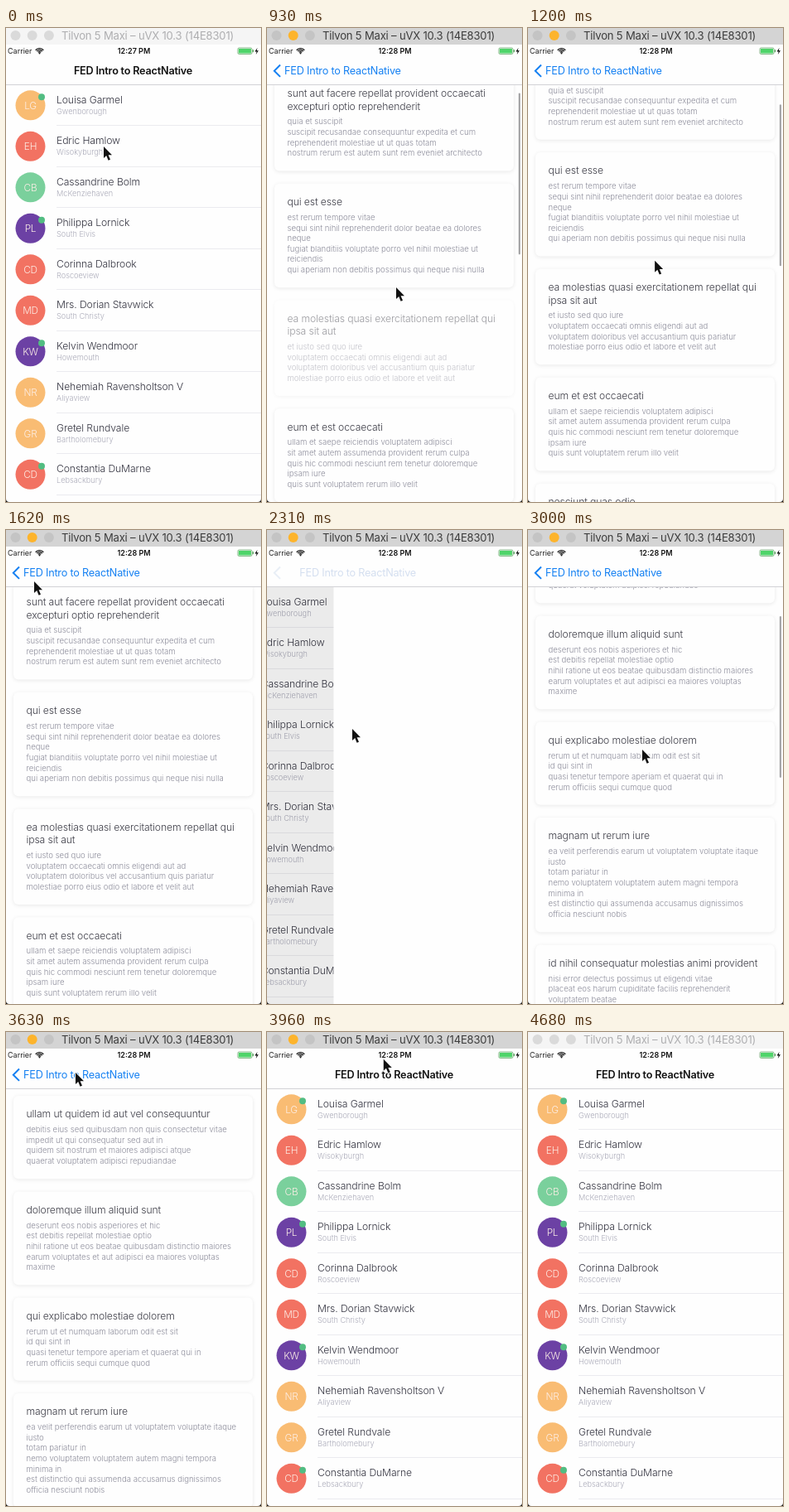
Write an HTML page with a canvas that moves like this. It is 308x572 px and loops after 4.71 s.

```html
<!DOCTYPE html>
<html lang="en">
<head>
<meta charset="utf-8">
<title>Contact list demo</title>
<style>
html, body { margin: 0; width: 100%; height: 100%; overflow: hidden; background: #fefefe; }
canvas { display: block; width: 308px; height: 572px; }
</style>
</head>
<body>
<canvas id="stage"></canvas>
<script>
const W = 308, H = 572, LOOP = 4710, TOP = 68.5;
const PAPER = '#fefefe', INK = '#111', BLUE = '#1580f2', FAINT_BLUE = '#c4d4ea';
const canvas = document.getElementById('stage');
const ctx = canvas.getContext('2d');
const ratio = window.devicePixelRatio || 1;
canvas.width = W * ratio;
canvas.height = H * ratio;

const ORANGE = '#f9bc73', RED = '#f27262', GREEN = '#7ad09c', PURPLE = '#6c41a4';
const people = [
  ['LG', 'Louisa Garmel', 'Gwenborough', ORANGE],
  ['EH', 'Edric Hamlow', 'Wisokyburgh', RED],
  ['CB', 'Cassandrine Bolm', 'McKenziehaven', GREEN],
  ['PL', 'Philippa Lornick', 'South Elvis', PURPLE],
  ['CD', 'Corinna Dalbrook', 'Roscoeview', RED],
  ['MD', 'Mrs. Dorian Stavwick', 'South Christy', RED],
  ['KW', 'Kelvin Wendmoor', 'Howemouth', PURPLE],
  ['NR', 'Nehemiah Ravensholtson V', 'Aliyaview', ORANGE],
  ['GR', 'Gretel Rundvale', 'Bartholomebury', ORANGE],
  ['CD', 'Constantia DuMarne', 'Lebsackbury', RED]
];

// Each post is [title, body]; "|" marks a line break.
const firstPosts = [
  ['sunt aut facere repellat provident occaecati|excepturi optio reprehenderit',
   'quia et suscipit|suscipit recusandae consequuntur expedita et cum|reprehenderit molestiae ut ut quas totam|nostrum rerum est autem sunt rem eveniet architecto'],
  ['qui est esse',
   'est rerum tempore vitae|sequi sint nihil reprehenderit dolor beatae ea dolores|neque|fugiat blanditiis voluptate porro vel nihil molestiae ut|reiciendis|qui aperiam non debitis possimus qui neque nisi nulla'],
  ['ea molestias quasi exercitationem repellat qui|ipsa sit aut',
   'et iusto sed quo iure|voluptatem occaecati omnis eligendi aut ad|voluptatem doloribus vel accusantium quis pariatur|molestiae porro eius odio et labore et velit aut'],
  ['eum et est occaecati',
   'ullam et saepe reiciendis voluptatem adipisci|sit amet autem assumenda provident rerum culpa|quis hic commodi nesciunt rem tenetur doloremque|ipsam iure|quis sunt voluptatem rerum illo velit'],
  ['nesciunt quas odio',
   'repudiandae veniam quaerat sunt sed|alias aut fugiat sit autem sed est|voluptatem omnis possimus esse voluptatibus quis|est aut tenetur dolor neque']
];
const secondPosts = [
  ['ullam ut quidem id aut vel consequuntur',
   'debitis eius sed quibusdam non quis consectetur vitae|impedit ut qui consequatur sed aut in|quidem sit nostrum et maiores adipisci atque|quaerat voluptatem adipisci repudiandae'],
  ['doloremque illum aliquid sunt',
   'deserunt eos nobis asperiores et hic|est debitis repellat molestiae optio|nihil ratione ut eos beatae quibusdam distinctio maiores|earum voluptates et aut adipisci ea maiores voluptas|maxime'],
  ['qui explicabo molestiae dolorem',
   'rerum ut et numquam laborum odit est sit|id qui sint in|quasi tenetur tempore aperiam et quaerat qui in|rerum officiis sequi cumque quod'],
  ['magnam ut rerum iure',
   'ea velit perferendis earum ut voluptatem voluptate itaque|iusto|totam pariatur in|nemo voluptatem voluptatem autem magni tempora|minima in|est distinctio qui assumenda accusamus dignissimos|officia nesciunt nobis'],
  ['id nihil consequatur molestias animi provident',
   'nisi error delectus possimus ut eligendi vitae|placeat eos harum cupiditate facilis reprehenderit|voluptatem beatae|modi ducimus quo illum voluptas eligendi|et nobis quia fugit']
];

// Motion tracks: [time, value, value ...]
const pointer = [
  [0, 118, 143], [300, 104, 92], [450, 104, 92], [760, 155, 370], [850, 155, 358],
  [930, 156, 313], [1080, 156, 245], [1330, 150, 320], [1620, 34, 62], [1680, 30, 50],
  [1850, 36, 62], [2160, 103, 240], [2330, 103, 240], [2620, 138, 345], [3000, 138, 265],
  [3070, 138, 245], [3350, 138, 350], [3630, 84, 49], [3690, 62, 48], [3830, 62, 48],
  [4170, 300, 2]
];
const firstScroll = [[850, 0], [930, 20], [1080, 88], [1360, 12]];
const secondScroll = [[2620, 0], [3000, 89], [3070, 108], [3380, 0]];
const pressFade = [[840, 1], [870, 0.4], [930, 0.5], [1010, 1]];
const SLIDE = 180;
const visits = [
  { open: 460, close: 1700, posts: firstPosts, scroll: firstScroll, bar: [820, 1420] },
  { open: 2223, close: 3710, posts: secondPosts, scroll: secondScroll, bar: [2600, 3460] }
];

const clamp = v => Math.max(0, Math.min(1, v));
const easeOut = v => 1 - (1 - clamp(v)) ** 2;

function sample(track, t) {
  if (t <= track[0][0]) return track[0].slice(1);
  for (let i = 1; i < track.length; i++) {
    const a = track[i - 1], b = track[i];
    if (t > b[0]) continue;
    const u = (t - a[0]) / (b[0] - a[0]), s = u * u * (3 - 2 * u);
    return a.slice(1).map((v, k) => v + (b[k + 1] - v) * s);
  }
  return track[track.length - 1].slice(1);
}

function text(str, x, y, size, color, { weight = 400, align = 'left', track = -0.2 } = {}) {
  ctx.font = `${weight} ${size}px Inter, sans-serif`;
  ctx.letterSpacing = track + 'px';
  ctx.textAlign = align;
  ctx.fillStyle = color;
  ctx.fillText(str, x, y + size * 0.36);
}

function disc(x, y, r, color) {
  ctx.fillStyle = color;
  ctx.beginPath();
  ctx.arc(x, y, r, 0, Math.PI * 2);
  ctx.fill();
}

function rect(x, y, w, h, color) {
  ctx.fillStyle = color;
  ctx.fillRect(x, y, w, h);
}

function roundRect(x, y, w, h, r) {
  ctx.beginPath();
  ctx.roundRect(x, y, w, h, r);
}

function polyline(points) {
  ctx.beginPath();
  points.forEach(([x, y]) => ctx.lineTo(x, y));
}

function drawTitleBar(active) {
  rect(0, 0, W, 20, active ? '#d4d4d4' : '#f5f5f5');
  const idle = active ? '#c4c4c4' : '#dadada';
  [idle, active ? '#fdb42c' : idle, idle].forEach((c, i) => disc(11.5 + 20.2 * i, 9, 6, c));
  text('Tilvon 5 Maxi – uVX 10.3 (14E8301)', 67, 9.5, 13.1, active ? '#3c3c3c' : '#aeaeb0');
}

function drawStatusBar(clock) {
  text('Carrier', 2, 28, 9, '#222', { track: 0 });
  ctx.strokeStyle = INK;
  ctx.lineWidth = 1.3;
  [2.4, 4.4, 6.4].forEach(r => {
    ctx.beginPath();
    ctx.arc(40.5, 31, r, -Math.PI * 0.77, -Math.PI * 0.23);
    ctx.stroke();
  });
  disc(40.5, 30.6, 1, INK);
  text(clock, 154.5, 28, 9, INK, { weight: 600, align: 'center', track: 0 });
  ctx.lineWidth = 0.7;
  ctx.strokeStyle = '#4a9a50';
  roundRect(280, 24, 17, 7.5, 1.5);
  ctx.stroke();
  rect(281, 25, 15, 5.5, '#4fd46a');
  rect(297.8, 26.2, 1.2, 3, '#4a9a50');
  ctx.fillStyle = INK;
  polyline([[303.5, 24], [300.5, 28.5], [302.7, 28.5], [301.8, 32], [305, 27.2], [302.9, 27.2]]);
  ctx.fill();
}

function drawHeader(p, clock) {
  rect(0, 20, W, TOP - 20, PAPER);
  drawStatusBar(clock);
  const label = 'FED Intro to ReactNative';
  const settled = p >= 0.98;
  if (p < 0.6) {
    ctx.globalAlpha = 1 - p / 0.6;
    text(label, 153.5 - 60 * p, 51.5, 12.65, INK, { weight: 600, align: 'center' });
  }
  if (p > 0) {
    const color = settled ? BLUE : FAINT_BLUE;
    ctx.globalAlpha = settled ? 1 : p;
    text(label, 21 + 70 * (1 - p), 51.5, 12.65, color);
    ctx.globalAlpha = settled ? 1 : p * 0.5;
    ctx.strokeStyle = color;
    ctx.lineWidth = 2;
    polyline([[16, 44.5], [8.8, 51.7], [16, 58.9]]);
    ctx.stroke();
  }
  ctx.globalAlpha = 1;
  rect(0, 68, W, 1, '#d2d2d6');
}

function drawList(p) {
  ctx.save();
  ctx.translate(-92.4 * p, 0);
  rect(0, TOP, W + 93, H, PAPER);
  people.forEach(([initials, name, town, color], i) => {
    const y = 49.5 * i;
    disc(29.5, 93.3 + y, 18, color);
    text(initials, 29.5, 93.3 + y, 11.8, '#fdeee6', { weight: 300, align: 'center' });
    if (i % 3 === 0) disc(43, 83.3 + y, 4, '#52bd82');
    text(name, 61, 86.5 + y, 12.2, '#343440', { weight: 300, track: -0.12 });
    text(town, 61, 100.5 + y, 9.2, '#acacba', { weight: 300, track: 0 });
    rect(61, Math.round(117.3 + y), W, 1, '#ebebef');
  });
  ctx.restore();
  if (p > 0) rect(0, TOP, W, H, `rgba(0, 0, 0, ${0.1 * p})`);
}

function drawCard(title, body, top, opacity) {
  const heads = title.split('|'), lines = body.split('|');
  const first = top + 22 + 15.3 * (heads.length - 1) + 18.7;
  const height = first + 12.65 * (lines.length - 1) + 21.6 - top;
  ctx.save();
  ctx.shadowColor = `rgba(0, 0, 0, ${0.09 * opacity})`;
  ctx.shadowBlur = 5 * ratio;
  ctx.shadowOffsetY = ratio;
  ctx.fillStyle = PAPER;
  roundRect(9, top, 289, height, 6);
  ctx.fill();
  ctx.restore();
  ctx.globalAlpha = opacity;
  heads.forEach((s, i) =>
    text(s, 24.5, top + 22 + 15.3 * i, 12.2, '#3c3c46', { weight: 300, track: -0.12 }));
  lines.forEach((s, i) =>
    text(s, 24.5, first + 12.65 * i, 9.6, '#8e8e9c', { weight: 300, track: 0 }));
  ctx.globalAlpha = 1;
  return height;
}

function drawPosts(visit, p, t) {
  ctx.save();
  ctx.translate(W * (1 - p), 0);
  rect(0, TOP, W, H, PAPER);
  ctx.beginPath();
  ctx.rect(0, TOP, W, H);
  ctx.clip();
  if (t > visit.open + SLIDE + 60) {
    const offset = sample(visit.scroll, t)[0];
    let top = 77 - offset;
    visit.posts.forEach(([title, body], i) => {
      const pressed = visit === visits[0] && i === 2;
      top += drawCard(title, body, top, pressed ? sample(pressFade, t)[0] : 1) + 15.2;
    });
    if (t > visit.bar[0] && t < visit.bar[1]) {
      ctx.fillStyle = '#a6a6a8';
      roundRect(303.8, 71 + offset * 0.37, 2.2, 195, 1.1);
      ctx.fill();
    }
  }
  ctx.restore();
}

function drawCorners() {
  ctx.beginPath();
  ctx.rect(0, H - 8, W, 8);
  ctx.roundRect(0, H - 20, W, 20, [0, 0, 4, 4]);
  ctx.rect(0, H - 20, W, 12);
  ctx.fillStyle = INK;
  ctx.fill('evenodd');
}

function drawPointer(t) {
  if (t > 4160) return;
  const [x, y] = sample(pointer, t);
  ctx.save();
  ctx.translate(x, y);
  polyline([[0, 0], [0, 14], [3.2, 11], [5.6, 16.8], [8, 15.8], [5.6, 10.2], [10, 10.2]]);
  ctx.closePath();
  ctx.lineJoin = 'round';
  ctx.lineWidth = 1.8;
  ctx.strokeStyle = '#fff';
  ctx.stroke();
  ctx.fillStyle = INK;
  ctx.fill();
  ctx.restore();
}

function draw(t) {
  ctx.setTransform(ratio, 0, 0, ratio, 0, 0);
  rect(0, 0, W, H, PAPER);
  const visit = visits.find(v => t >= v.open && t < v.close + SLIDE);
  const p = visit
    ? easeOut((t - visit.open) / SLIDE) * (1 - easeOut((t - visit.close) / SLIDE))
    : 0;
  if (p < 1) drawList(p);
  if (visit) drawPosts(visit, p, t);
  drawHeader(p, t < 540 ? '12:27 PM' : '12:28 PM');
  drawTitleBar(t >= 390 && t < 4200);
  drawCorners();
  drawPointer(t);
}

const start = performance.now();
function tick() {
  draw((performance.now() - start) % LOOP);
  requestAnimationFrame(tick);
}
tick();
</script>
</body>
</html>
```
